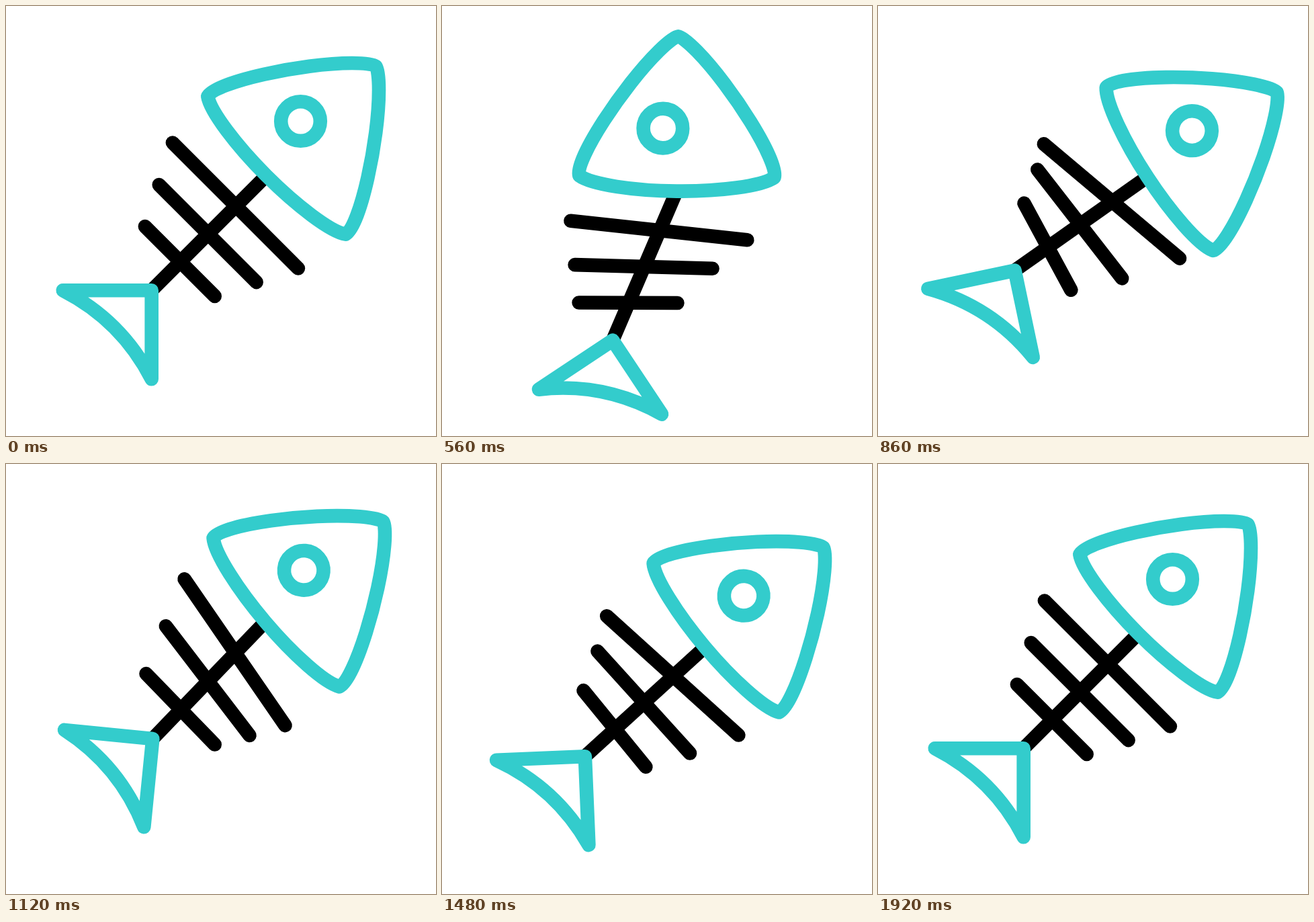
These frames come from a looping animation (640 px wide and 640 px high, 2.4 s). An HTML page with a canvas:

```html
<!DOCTYPE html>
<html lang="en">
<head>
<meta charset="utf-8">
<title>Fish bone</title>
<style>
  html, body { margin: 0; width: 100%; height: 100%; overflow: hidden; background: #fff; }
  canvas { display: block; width: 640px; height: 640px; }
</style>
</head>
<body>
<canvas id="stage" width="640" height="640"></canvas>
<script>
const canvas = document.getElementById('stage');
const ctx = canvas.getContext('2d');
const LOOP = 2400, STEP = 20;
const TEAL = '#33cccc', BLACK = '#000';
const CENTER = [300.3, 338.9];

// [time, value] keys, eased in and out between neighbours
const SWING = [[0, 0], [515, -23], [917, 11.7], [1230, -6.2], [1436, 3.1], [1622, 0]];
const BOB = [[0, 0], [560, 49.3], [995, -33], [1340, 24], [1700, 0]];

// each part follows the spine's swing a little later
const LAG = { head: 83, tail: 298 };
const RIBS = [
  { x: 341.4, y: 297, half: 132.2, lag: 217 },
  { x: 300.2, y: 338.6, half: 102.5, lag: 121 },
  { x: 258.8, y: 380, half: 73.4, lag: 38 }
];

const headPath = new Path2D(
  'M300.3 134.5 C312 113 440 85 515 85 C532 85 546 86.5 550.3 89.7' +
  ' C553.5 94 555 108 555 125 C555 200 527 328 505.5 339.7' +
  ' C483 336 432 297 387.5 252.5 C343 208 304 157 300.3 134.5 Z');
const tailPath = new Path2D('M84.7 423.3 H216.7 V555.3 Q172 468 84.7 423.3 Z');
const eyePath = new Path2D();
eyePath.arc(438.5, 171.5, 29.3, 0, Math.PI * 2);

function valueAt(keys, t) {
  if (t <= 0) return keys[0][1];
  for (let i = 1; i < keys.length; i++) {
    const [t0, a] = keys[i - 1], [t1, b] = keys[i];
    if (t < t1) {
      const u = (t - t0) / (t1 - t0);
      return a + (b - a) * u * u * (3 - 2 * u);
    }
  }
  return keys[keys.length - 1][1];
}

function turn(x, y, deg) {
  ctx.translate(x, y);
  ctx.rotate(deg * Math.PI / 180);
  ctx.translate(-x, -y);
}

function part(x, y, deg, draw) {
  ctx.save();
  turn(x, y, deg);
  draw();
  ctx.restore();
}

function line(x0, y0, x1, y1) {
  ctx.beginPath();
  ctx.moveTo(x0, y0);
  ctx.lineTo(x1, y1);
  ctx.stroke();
}

function render(t) {
  ctx.fillStyle = '#fff';
  ctx.fillRect(0, 0, 640, 640);
  ctx.lineWidth = 20.6;
  ctx.lineCap = ctx.lineJoin = 'round';

  ctx.save();
  ctx.translate(0, valueAt(BOB, t));
  turn(...CENTER, valueAt(SWING, t));

  ctx.strokeStyle = BLACK;
  line(217, 423, 386, 254);
  for (const { x, y, half, lag } of RIBS) {
    const d = half * Math.SQRT1_2;
    part(x, y, valueAt(SWING, t - lag), () => line(x - d, y - d, x + d, y + d));
  }

  ctx.strokeStyle = TEAL;
  part(387.5, 252.5, valueAt(SWING, t - LAG.head), () => {
    ctx.stroke(headPath);
    ctx.stroke(eyePath);
  });
  part(216.7, 423.3, valueAt(SWING, t - LAG.tail), () => ctx.stroke(tailPath));
  ctx.restore();
}

const start = performance.now();
function tick() {
  const t = (performance.now() - start) % LOOP;
  render(Math.floor(t / STEP) * STEP);
  requestAnimationFrame(tick);
}
tick();
</script>
</body>
</html>
```
